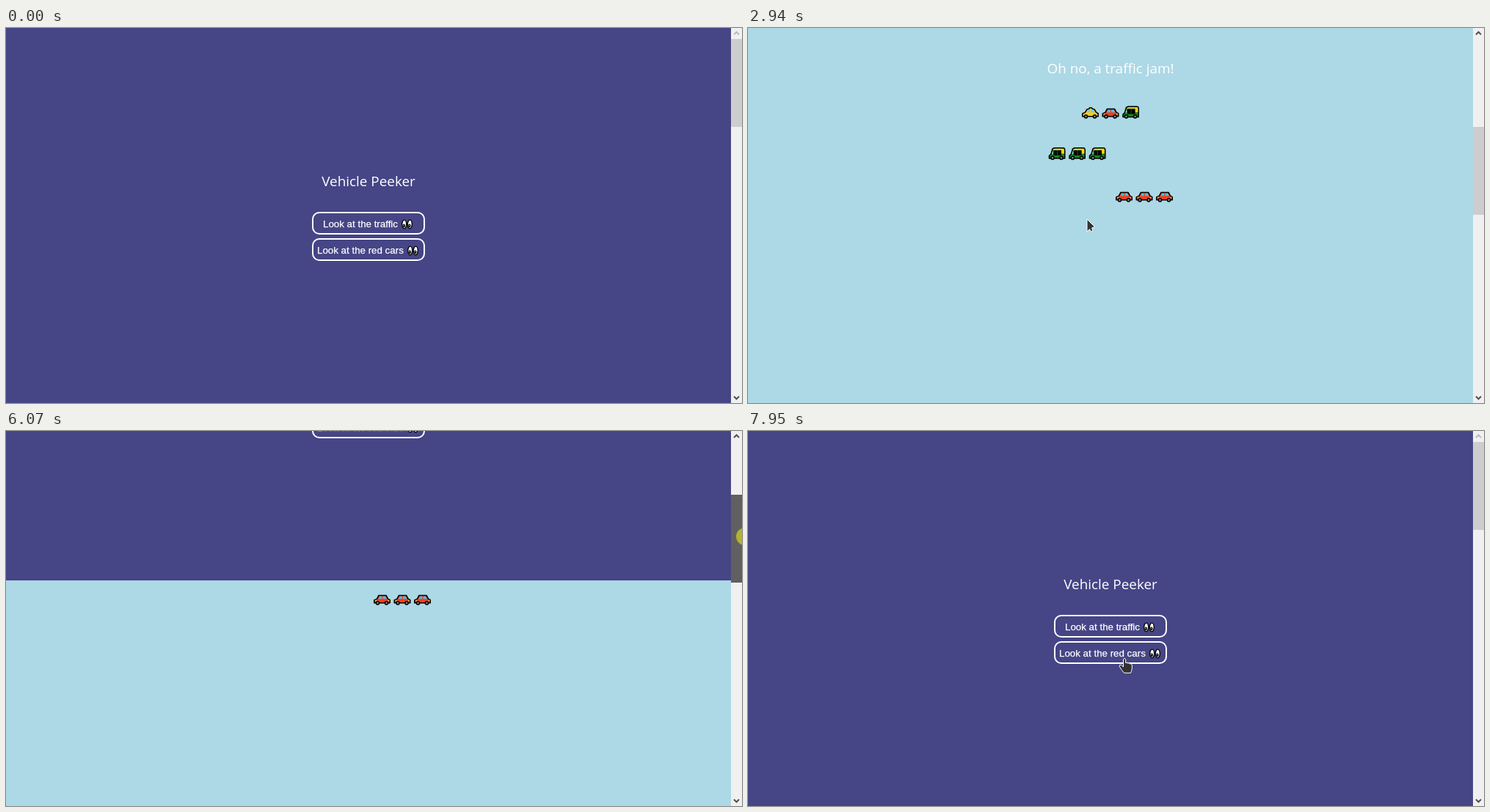
An HTML page that plays this animation: 1003 by 512 pixels, repeating every 8 s.

```html
<!DOCTYPE html>
<html lang="en">
<head>
<meta charset="utf-8">
<title>Vehicle Peeker</title>
<style>
html, body { margin: 0; width: 100%; height: 100%; overflow: hidden; }
svg { display: block; width: 100vw; height: 100vh; }
.head { font: 18.9px "Open Sans", "Noto Sans", sans-serif; fill: #fff; text-anchor: middle; }
.label { font: 13.333px "Liberation Sans", Arial, sans-serif; fill: #fff; stroke: #fff; stroke-width: .25; }
.chevron { fill: none; stroke-width: 2; }
.pointer { fill: #333; stroke: #fff; stroke-width: 1; stroke-linejoin: round; }
</style>
</head>
<body>
<svg viewBox="0 0 1003 512">
  <defs>
    <g id="wheels">
      <circle cx="5.5" cy="11.3" r="2.1" fill="#888" stroke="#000" stroke-width="1.5"/>
      <circle cx="17.5" cy="11.3" r="2.1" fill="#888" stroke="#000" stroke-width="1.5"/>
    </g>
    <g id="car">
      <path d="M.8 11V7.5L4.5 5.6 7 1H17l2.5 4.6 2.7 1.6V11.300H.8z" fill="#ee3f20" stroke="#000" stroke-width="1.6" stroke-linejoin="round"/>
      <path d="M6.500 5.800 8.200 2.300H11.200V5.800zM12.600 2.300H16L17.700 5.800H12.600z" fill="#3cc3ec"/>
      <path d="M2 8h2M19.500 8h2" stroke="#ffc04a" stroke-width="1.5"/>
      <use href="#wheels"/>
    </g>
    <g id="taxi">
      <path d="M.8 11V7.500L4.500 5.600 7 1.500 9.500 1 10.500-.5H13.500L14.500 1 17 1.500l2.500 4.100 2.700 1.600V11.300H.8z" fill="#ffc91c" stroke="#000" stroke-width="1.6" stroke-linejoin="round"/>
      <path d="M6.500 5.800 8.200 2.300H11.200V5.800zM12.600 2.300H16L17.700 5.800H12.600z" fill="#6ad2f2"/>
      <use href="#wheels"/>
    </g>
    <g id="auto">
      <path d="M1 15V11.500L3.500 9 5.500 2 8 .8H20.500Q22.200 1 22.200 3V15z" fill="#108a1c" stroke="#000" stroke-width="1.600" stroke-linejoin="round"/>
      <path d="M6 3 8.200 1.700H20.200Q21.400 2 21.400 3V8.500H17.500V3.800H6z" fill="#ffd21e"/>
      <path d="M7 4H17.500V11H7z"/>
      <path d="M5.800 4.500 4.300 9H6.200z" fill="#8be0ee"/>
      <path d="M12 4V11" stroke="#2b4b2b"/>
      <use href="#wheels" y="3"/>
    </g>
    <g id="eyes">
      <g id="eye">
        <ellipse cx="3.700" cy="7" rx="3" ry="5.900" fill="#fff" stroke="#000" stroke-width="1.400"/>
        <ellipse cx="3.200" cy="9" rx="1.700" ry="2.400"/>
        <circle cx="2.800" cy="8.300" r=".6" fill="#fff"/>
      </g>
      <use href="#eye" x="7.600"/>
    </g>
  </defs>

  <rect width="1003" height="512" fill="#add8e6"/>
  <text class="head" x="494" y="62">Oh no, a traffic jam!</text>
  <g id="jam"></g>

  <g id="intro">
    <rect width="988" height="512" fill="#464586"/>
    <text class="head" x="494" y="216">Vehicle Peeker</text>
    <g fill="none" stroke="#fff" stroke-width="2">
      <rect x="418" y="252" width="152" height="29" rx="9"/>
      <rect x="418" y="288" width="152" height="29" rx="9"/>
    </g>
    <text class="label" x="432" y="272">Look at the traffic</text>
    <text class="label" x="424" y="308">Look at the red cars</text>
    <use href="#eyes" x="539" y="261"/>
    <use href="#eyes" x="547" y="297"/>
  </g>

  <rect x="988" width="15" height="512" fill="#f0f0f0"/>
  <rect id="thumb" x="988" width="15" height="120"/>
  <path id="up" class="chevron" d="M992 9l3.500-3.500L999 9"/>
  <path class="chevron" d="M992 503l3.500 3.500L999 503" stroke="#505050"/>

  <g id="cursor">
    <path id="arrow" class="pointer" d="M0 0V17L3.500 13.700 5.300 16.900 8 15.600 6.500 12 10.500 10.500z"/>
    <path id="hand" class="pointer" d="M-1.500 1.500Q0-.8 1.700 1.500V6.500Q3.500 5.600 4.500 7 6.500 6.200 7.500 7.800 9.800 7.300 10.300 9.500V14Q10 17.500 8.500 20.300H-.5Q-3.500 17-6.800 11.500-7.200 8.800-4.500 9.500L-1.500 12z"/>
    <circle id="press" r="12" fill="#d4d11c" opacity=".72"/>
  </g>
</svg>
<script>
const $ = id => document.getElementById(id);
const LOOP = 8000, STEP = 200 / 3, PAGE = 512, TOP = 15, RUN = 120;

const row = (x, y, kinds) => kinds.map((kind, i) =>
  `<use href="#${kind}" x="${x + i * 27.5}" y="${y - (kind === 'auto' ? 3 : 0)}"/>`).join('');
$('jam').innerHTML =
  row(455, 109.5, ['taxi', 'car', 'auto']) +
  row(409.5, 166, ['auto', 'auto', 'auto']) +
  row(501, 223.5, ['car', 'car', 'car']);

// pointer path: time, x, y
const path = [
  [800, 846, 495], [933, 760, 430], [1133, 600, 330], [1333, 500, 278], [1600, 462, 261],
  [4267, 462, 261], [4533, 560, 266], [4800, 800, 235], [5000, 950, 207], [5133, 985, 199],
  [5200, 987, 198], [5333, 987, 198], [5400, 990, 195], [5467, 997, 192], [5600, 997, 192],
  [5800, 995, 191], [6067, 1007, 144.2], [6400, 1006, 89], [6467, 1003, 73], [6533, 1002, 71],
  [6933, 1000, 66], [7133, 1000, 66], [7267, 930, 100], [7467, 760, 190], [7667, 590, 285],
  [7867, 523, 312], [7933, 513, 310]
];

const clamp = (v, lo, hi) => Math.min(hi, Math.max(lo, v));
const smooth = p => p * p * (3 - 2 * p);
const within = (t, from, to) => t >= from && t < to;
const show = (id, on) => $(id).setAttribute('visibility', on ? 'visible' : 'hidden');

function pointerAt(t) {
  const i = path.findIndex(k => k[0] > t);
  if (i < 0) return path[path.length - 1].slice(1);
  if (i === 0) return path[0].slice(1);
  const a = path[i - 1], b = path[i], p = (t - a[0]) / (b[0] - a[0]);
  return [a[1] + (b[1] - a[1]) * p, a[2] + (b[2] - a[2]) * p];
}

function scrollAt(t, y) {
  if (t < 5460) return PAGE * smooth(clamp((t - 2520) / 377, 0, 1));
  if (t > 6500) return 0;
  return (clamp(y - 57, TOP, TOP + RUN) - TOP) * PAGE / RUN;
}

function draw(ms) {
  const t = Math.floor((ms + 22) / STEP) * STEP + .5;
  const [x, y] = pointerAt(t);
  const scroll = Math.round(scrollAt(t, y));
  const drag = within(t, 5467, 7133);
  const hover = within(t, 5400, 7200);
  const hand = within(t, 1666, 2933) || t >= 7800;

  $('intro').setAttribute('transform', `translate(0 ${-scroll})`);
  $('thumb').setAttribute('y', Math.round(TOP + scroll * RUN / PAGE));
  $('thumb').setAttribute('fill', drag ? '#606060' : hover ? '#a6a6a6' : '#cdcdcd');
  $('up').setAttribute('stroke', scroll ? '#505050' : '#bababa');
  $('cursor').setAttribute('transform', `translate(${Math.round(x)} ${Math.round(y)})`);
  const seen = t >= 800;
  show('arrow', seen && !hand);
  show('hand', seen && hand);
  show('press', drag || within(t, 2400, 2533));
}

const start = performance.now();
function tick() {
  draw((performance.now() - start) % LOOP);
  requestAnimationFrame(tick);
}
tick();
</script>
</body>
</html>
```
